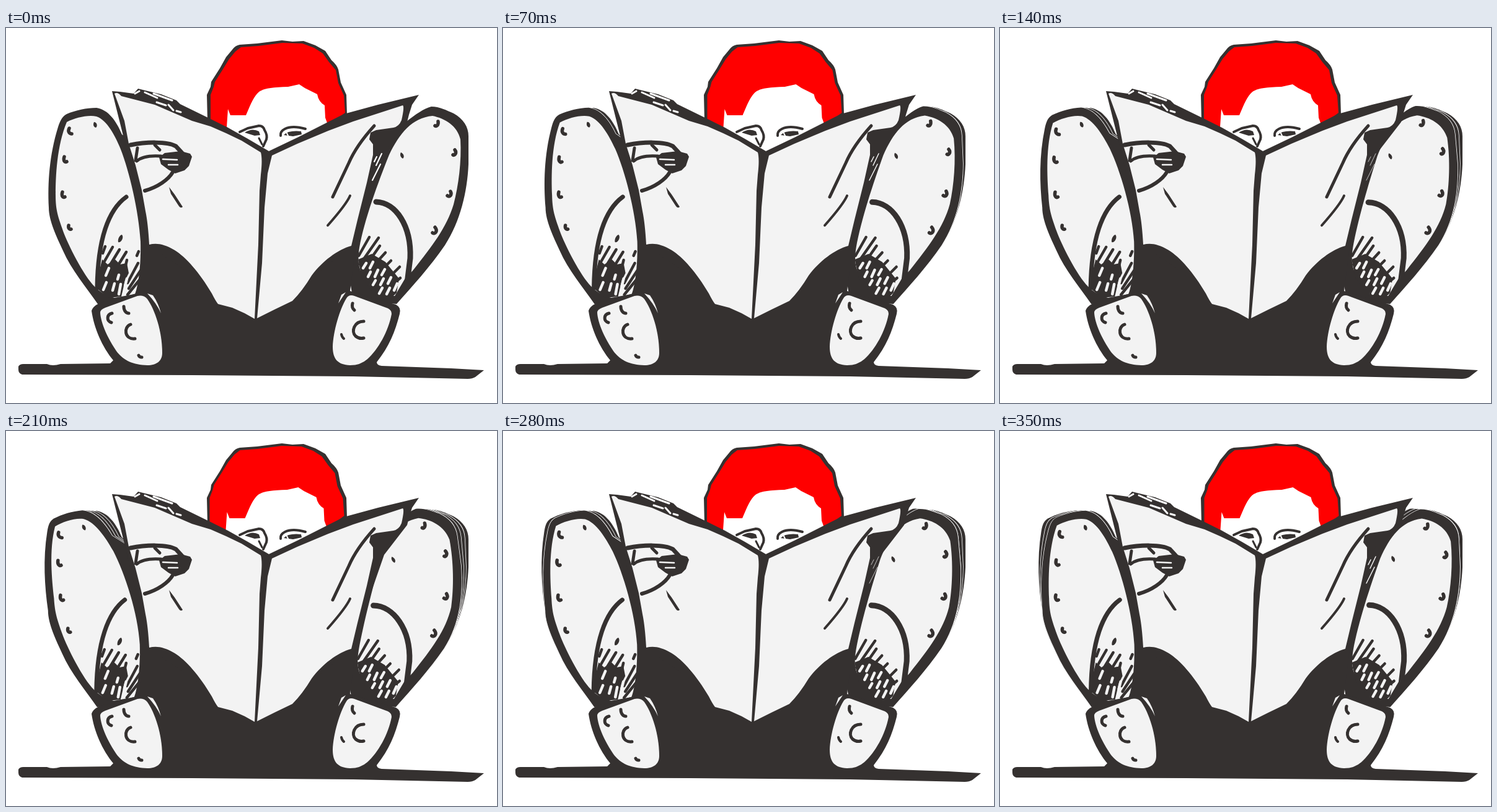
Animation, 792 px wide and 606 px high, one loop 420 ms. Source, as an HTML page with a canvas:

```html
<!DOCTYPE html>
<html lang="en">
<head>
<meta charset="utf-8">
<title>Reader tapping his feet</title>
<style>
html, body { margin: 0; width: 100%; height: 100%; overflow: hidden; background: #fff; }
canvas { display: block; }
</style>
</head>
<body>
<canvas id="stage" width="792" height="606"></canvas>
<script>
const ctx = document.getElementById('stage').getContext('2d');
const INK = '#353130', PAPER = '#f3f3f3', RED = '#ff0000', WHITE = '#fff';
const STEP = 70, SWING = [0, 1, 2, 3, 2, 1];

function fill(d, color = INK) {
  ctx.fillStyle = color;
  ctx.fill(new Path2D(d));
}

function line(d, width, color = INK) {
  ctx.strokeStyle = color;
  ctx.lineWidth = width;
  ctx.stroke(new Path2D(d));
}

// Bend a path: the higher a point lies above the ankle, the further it leans left.
function bend(d, foot, s) {
  return d.replace(/([\d.]+),([\d.]+)/g, (_, x, y) => {
    const f = Math.max(0, (foot.pivot - y) / foot.span) ** foot.power * s / 3;
    const dx = -foot.reach * f - 0.4 * s;
    const dy = -(x - foot.axis) * foot.turn * f;
    return (+x + dx).toFixed(2) + ',' + (+y + dy).toFixed(2);
  });
}

const left = {
  pivot: 290, span: 134, power: 1.3, reach: 17, axis: 135, turn: 0.06,
  shape: 'M148,446 C130,420 105,390 92,360 C82,338 69,312 69,290 C67,250 70,205 84,160 C88,148 91,143 98,139 C112,133 130,129 146,129 C165,132 178,150 187,172 L212,190 L240,350 L240,440Z',
  sole: 'M98,152 C112,145 132,140 146,143 C163,149 176,174 185,196 C199,232 214,295 217,345 C218,380 214,415 208,430 L175,436 C160,432 150,425 143,418 C125,400 100,350 92,328 C84,305 80,295 80,270 C80,240 82,190 98,152Z',
  arch: 'M194,273 C166,293 148,340 147,420', archWidth: 7,
  nails: 'M102,162 C99,168 103,171 106,171 M94,208 C92,214 95,218 98,216 M91,265 C89,271 92,275 95,273 M101,319 C100,324 103,326 105,325',
  drops: 'M142,152 C147,152 148,159 145,161 C141,160 140,156 142,152Z M187,334 C191,339 185,348 181,346 C180,341 183,335 187,334Z',
  hatch: 'M146,412 L155,374 L164,382 L176,374 L184,382 L195,380 L198,396 L192,408 L186,434 L165,436 L148,422Z',
  rays: 'M156,364 L160,353 M156,382 L172,354 M166,386 L183,358 M178,388 L194,362 M189,400 L195,375 M196,412 L213,380 M198,421 L217,392 M196,431 L217,405 M211,368 L214,361',
  slits: 'M161,400 L166,388 M157,423 L162,411 M172,424 L175,413 M180,406 L182,399 M182,430 L185,414 M192,417 L195,405'
};

const right = {
  pivot: 310, span: 156, power: 1.1, reach: 20, axis: 675, turn: 0.09,
  shape: 'M630,446 C655,418 684,386 708,351 C733,312 744,265 746,220 L746,175 C746,160 738,147 722,138 C710,133 700,127 686,127 C674,130 660,140 645,152 L600,165 L560,230 L545,350 L560,440Z',
  sole: 'M688,142 C708,146 728,158 733,180 C735,215 730,255 722,285 C711,322 687,353 657,391 L643,406 L627,433 L598,433 L574,396 C567,384 568,368 570,355 C578,310 600,250 618,205 C635,170 655,145 688,142Z',
  arch: 'M597,281 C629,282 654,320 652,372 L647,412', archWidth: 9,
  nails: 'M697,151 C698,157 694,160 692,158 M724,197 C728,202 723,207 721,205 M717,264 C720,270 715,274 712,271 M692,322 C697,328 692,334 688,331',
  drops: 'M637,201 C642,203 643,209 640,211 C636,209 635,204 637,201Z',
  hatch: 'M568,374 L590,365 L612,378 L634,405 L630,428 L618,440 L598,436 L574,404Z',
  rays: 'M569,368 L586,338 M571,382 L601,339 M580,385 L603,352 M592,385 L612,363 M605,392 L621,376 M620,401 L635,386 M625,413 L636,404',
  slits: 'M576,388 L581,380 M587,388 L592,378 M584,402 L588,394 M595,402 L600,391 M606,399 L611,390 M592,415 L596,408 M604,415 L609,405 M616,413 L621,403 M602,429 L607,420 M614,430 L619,420 M626,424 L631,413'
};

// Earlier poses stay behind the current one, parted by a hairline.
function drawFoot(foot, count) {
  for (let i = 0; i <= count; i++) {
    const d = bend(foot.shape, foot, SWING[i]);
    if (i) line(d, 1.6, WHITE);
    fill(d);
  }
  const s = SWING[count], at = d => bend(d, foot, s);
  fill(at(foot.sole), PAPER);
  line(at(foot.arch), foot.archWidth);
  line(at(foot.nails), 5.5);
  fill(at(foot.drops));
  fill(at(foot.hatch));
  line(at(foot.rays), 4.5);
  line(at(foot.slits), 4.5, PAPER);
}

function drawHead(s) {
  fill('M325,150 L324,108 L330,95 L331,87 L345,65 L355,47 L365,35 Q370,28 377,27 L405,25 L445,20 L462,22 L480,21 L499,28 L515,37 L525,52 Q534,60 536,67 L540,88 L549,108 L550,140 L424,205Z');
  ctx.save();
  ctx.translate(-0.5 * s, 0);
  fill('M330,148 L330,108 L335,95 L337,87 L349,68 L360,50 L370,38 L379,31 L407,29 L446,24 L478,25 L497,32 L511,41 L521,55 L532,68 L536,89 L545,109 L547,137 L519,158 L424,190 L357,162Z', RED);
  fill('M356,160 L358,131 L362,141 L387,141 L393,127 Q403,104 412,101 Q420,96 455,95 L473,91 L482,97 L502,107 Q504,119 514,125 L515,145 L519,156 L424,205Z', WHITE);
  ctx.restore();
  line('M377,168 L390,162 L408,158 Q415,158 417,165 Q422,173 420,180 L415,191', 4);
  fill('M385,169 Q397,161 408,167 L410,173 L401,174Z');
  line('M408,178 L413,188', 3);
  line('M443,174 Q442,167 450,163 Q462,157 483,163', 4);
  fill('M448,173 Q455,165 476,167 L477,172 L463,175Z');
  line('M453,170 L455,174', 2, WHITE);
}

function drawGround() {
  fill('M138,457 Q140,450 150,445 L225,425 L225,345 L410,400 L565,345 L555,425 L629,447 Q638,452 635,462 C628,490 618,515 598,540 Q598,545 606,546 L718,550 L771,553 L757,564 Q752,567 745,567 L560,563 L300,561 L26,560 Q20,558 20,552 L20,547 Q22,543 28,543 L66,543 Q75,547 88,543 L168,542 L173,537 C155,515 142,485 138,457Z');
}

function drawHeels() {
  fill('M152,460 Q152,455 160,452 L212,433 Q222,431 228,438 C240,455 252,490 252,525 C252,538 243,545 228,545 C205,544 190,538 178,522 C165,503 153,478 152,460Z', PAPER);
  fill('M549,437 Q553,430 562,433 L616,453 Q622,456 622,462 C617,490 600,520 583,535 Q572,545 555,545 C535,544 527,535 527,515 C528,490 538,455 549,437Z', PAPER);
  fill('M228,429 L237,432 Q246,445 250,461 Q243,445 228,429Z M536,445 L541,431 L548,427Z', PAPER);
  line('M171,461 C162,463 162,474 170,476 M190,450 C190,457 194,461 198,461 M201,479 C189,483 191,504 208,502 M214,529 Q215,532 219,532', 5);
  line('M559,445 Q557,452 562,456 M577,474 C562,474 556,490 564,498 Q570,503 577,501', 5);
  line('M541,495 Q542,500 545,502', 4);
}

function drawPaper(s) {
  fill('M171,102 L184,103 L206,106 L213,98 L225,101 L250,107 L275,117 L281,123 L330,147 L358,161 L390,179 L424,199 L470,177 L545,139 L600,124 L666,108 L655,124 L650,140 L647,152 L610,200 L557,353 L403,473 L231,351 L191,182Z');
  fill('M175,106 Q180,103 186,110 L240,124 L300,150 L330,159 L355,170 L380,182 L411,201 Q414,212 411,237 L409,263 L407,350 L401,470 L385,461 L365,452 L342,446 Q338,441 332,429 C312,395 290,370 272,359 C255,349 243,347 231,350 Q229,315 225,296 L219,262 L209,222 L198,187 L191,150Z', PAPER);
  fill('M429,206 L470,187 L520,166 L560,151 L640,125 Q643,127 638,149 Q634,159 625,161 L597,165 L588,169 L586,180 L592,188 L592,205 L582,250 L567,310 L557,352 C535,358 510,377 493,400 Q478,425 462,441 L433,455 L405,469 L413,380 L417,290 L422,235Z', PAPER);
  line('M208,106 L215,102 M224,104 L244,113 M238,106 L268,117 M243,120 L258,125 M262,124 L270,133 M275,134 L282,136', 3, WHITE);

  // folds
  line('M594,158 Q565,190 553,218 L527,273', 5);
  line('M555,271 Q549,285 519,319', 4);
  fill('M263,257 L272,269 L285,289 Q282,292 279,288 L266,268Z');
  const gap = 3 - s;
  if (gap > 0) line('M606,203 L597,222 M604,220 L591,246 M598,208 L594,216', gap * 0.7, WHITE);

  // hand
  line('M201,189 C225,184 260,183 274,191 L285,203', 7);
  line('M212,194 L209,214 M211,215 Q222,205 250,207 M240,189 L248,197', 5);
  fill('M247,209 L256,202 L282,199 L297,203 L300,208 L295,223 L288,230 L273,235 L262,229 L250,220Z');
  line('M253,212 L276,213 M262,221 L277,221', 2.5, PAPER);
  line('M269,233 C262,245 245,257 224,263', 6);
}

function draw(time) {
  const n = Math.floor(time / STEP) % SWING.length, s = SWING[n];
  ctx.lineCap = ctx.lineJoin = 'round';
  ctx.fillStyle = WHITE;
  ctx.fillRect(0, 0, 792, 606);
  drawHead(s);
  drawFoot(left, n);
  drawFoot(right, n);
  drawGround();
  drawHeels();
  drawPaper(s);
}

const start = performance.now();
function tick() {
  draw(performance.now() - start);
  requestAnimationFrame(tick);
}
tick();
</script>
</body>
</html>
```
